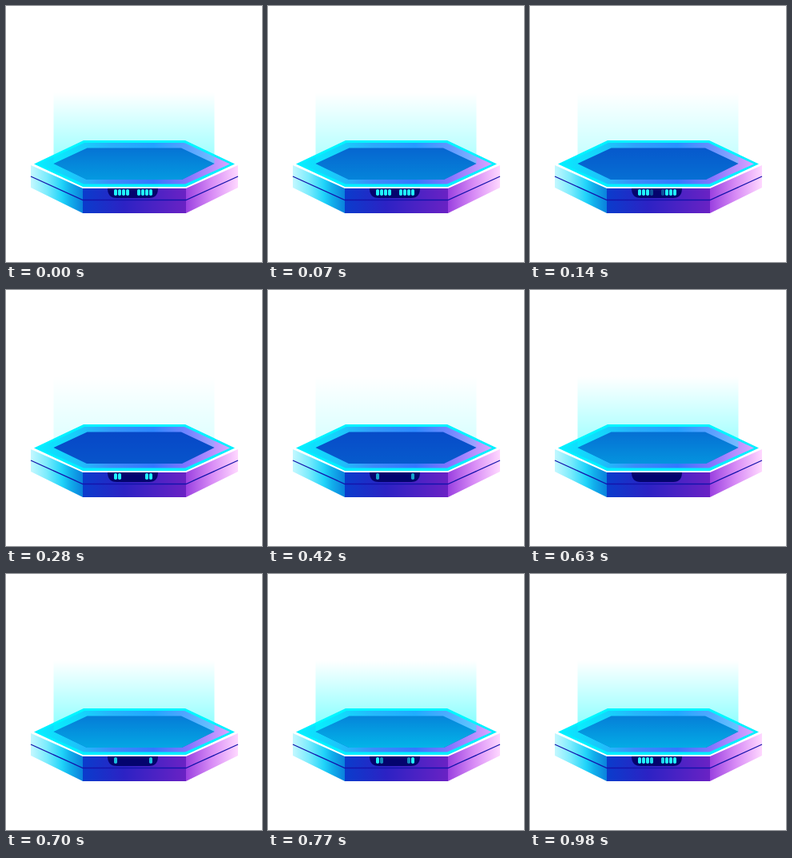
Recreate the animation shown at these times as an HTML page. Size 320 px wide and 320 px high, loop 1050 ms.

```html
<!DOCTYPE html>
<html lang="en">
<head>
<meta charset="utf-8">
<title>Hologram platform</title>
<style>
html, body { margin: 0; width: 100%; height: 100%; overflow: hidden; background: #fff; }
svg { display: block; width: 100%; height: 100%; }
</style>
</head>
<body>
<svg viewBox="0 0 320 320">
  <defs>
    <linearGradient id="left">
      <stop offset="0" stop-color="#c4f8ff"/>
      <stop offset=".3" stop-color="#7cecfd"/>
      <stop offset=".6" stop-color="#20d4fa"/>
      <stop offset=".75" stop-color="#12b0ec"/>
      <stop offset="1" stop-color="#0a80dc"/>
    </linearGradient>
    <linearGradient id="front">
      <stop offset="0" stop-color="#0a3ccc"/>
      <stop offset=".4" stop-color="#2c22c4"/>
      <stop offset="1" stop-color="#6a22c4"/>
    </linearGradient>
    <linearGradient id="right">
      <stop offset="0" stop-color="#9a40e0"/>
      <stop offset=".5" stop-color="#d88cf6"/>
      <stop offset="1" stop-color="#ffd8ff"/>
    </linearGradient>
    <linearGradient id="ring">
      <stop offset="0" stop-color="#08ecff"/>
      <stop offset=".2" stop-color="#1cc4fa"/>
      <stop offset=".38" stop-color="#3c8cfa"/>
      <stop offset=".6" stop-color="#3478ff"/>
      <stop offset=".78" stop-color="#8474ff"/>
      <stop offset="1" stop-color="#dca4ff"/>
    </linearGradient>
    <linearGradient id="beam" gradientUnits="userSpaceOnUse" x1="0" y1="108" x2="0" y2="217">
      <stop offset="0" stop-color="#0ff" stop-opacity="0"/>
      <stop offset="1" stop-color="#0ff"/>
    </linearGradient>
  </defs>

  <path fill="url(#left)" d="M31 198L96 227V259L31 227Z"/>
  <path fill="url(#front)" d="M96 227H225V259H96Z"/>
  <path fill="url(#right)" d="M225 227L290 198V227L225 259Z"/>
  <path fill="none" stroke="#1414ac" stroke-width="1.3" d="M31 213L96 242.5H225L290 213"/>

  <path fill="#fff" d="M31 197L97 168H224L290 197V199L225 228H96L31 199Z"/>
  <path fill="#00f0ff" d="M35 197.5L97 168H224L286 197.5L225 226H96Z"/>
  <path fill="url(#ring)" d="M41 197.5L98 171H223L280 197.5L224 222.5H97Z"/>
  <path fill="#0830c0" d="M59.5 197L101.5 177.5H219L260.5 197L220 217H101Z"/>

  <path fill="#04046e" d="M127 228H190Q190 240 179 240H138Q127 240 127 228Z"/>
  <g id="bars" fill="#20f4fc"></g>
  <path id="glow" fill="url(#beam)" d="M59.5 108H260.5V197L220 217H101L59.5 197Z"/>
</svg>
<script>
const LOOP = 1050, STEP = 70;
const bars = document.getElementById('bars');
const glow = document.getElementById('glow');
const clamp = (v, lo, hi) => Math.min(hi, Math.max(lo, v));

function addBar(x) {
  const bar = document.createElementNS('http://www.w3.org/2000/svg', 'rect');
  const box = { x, y: 229, width: 4, height: 8, rx: 1.8 };
  for (const key in box) bar.setAttribute(key, box[key]);
  return bars.appendChild(bar);
}

// Each pair holds a bar and its mirror, from the outside in.
const pairs = [0, 1, 2, 3].map(i => [addBar(135 + 5 * i), addBar(179 - 5 * i)]);

function draw(now) {
  const t = Math.floor(now % LOOP / STEP) * STEP;
  const pulse = (1 + Math.cos((t - 850) / LOOP * 2 * Math.PI)) / 2;
  glow.setAttribute('opacity', 0.67 * (0.25 + 0.75 * pulse));

  const lit = t < 560 ? 4 - (t - 70) / 105 : (t - 630) / 90;
  pairs.forEach((pair, i) => {
    for (const bar of pair) bar.setAttribute('opacity', clamp(lit - i, 0, 1));
  });
}

const start = performance.now();
function frame() {
  draw(performance.now() - start);
  requestAnimationFrame(frame);
}
frame();
</script>
</body>
</html>
```
